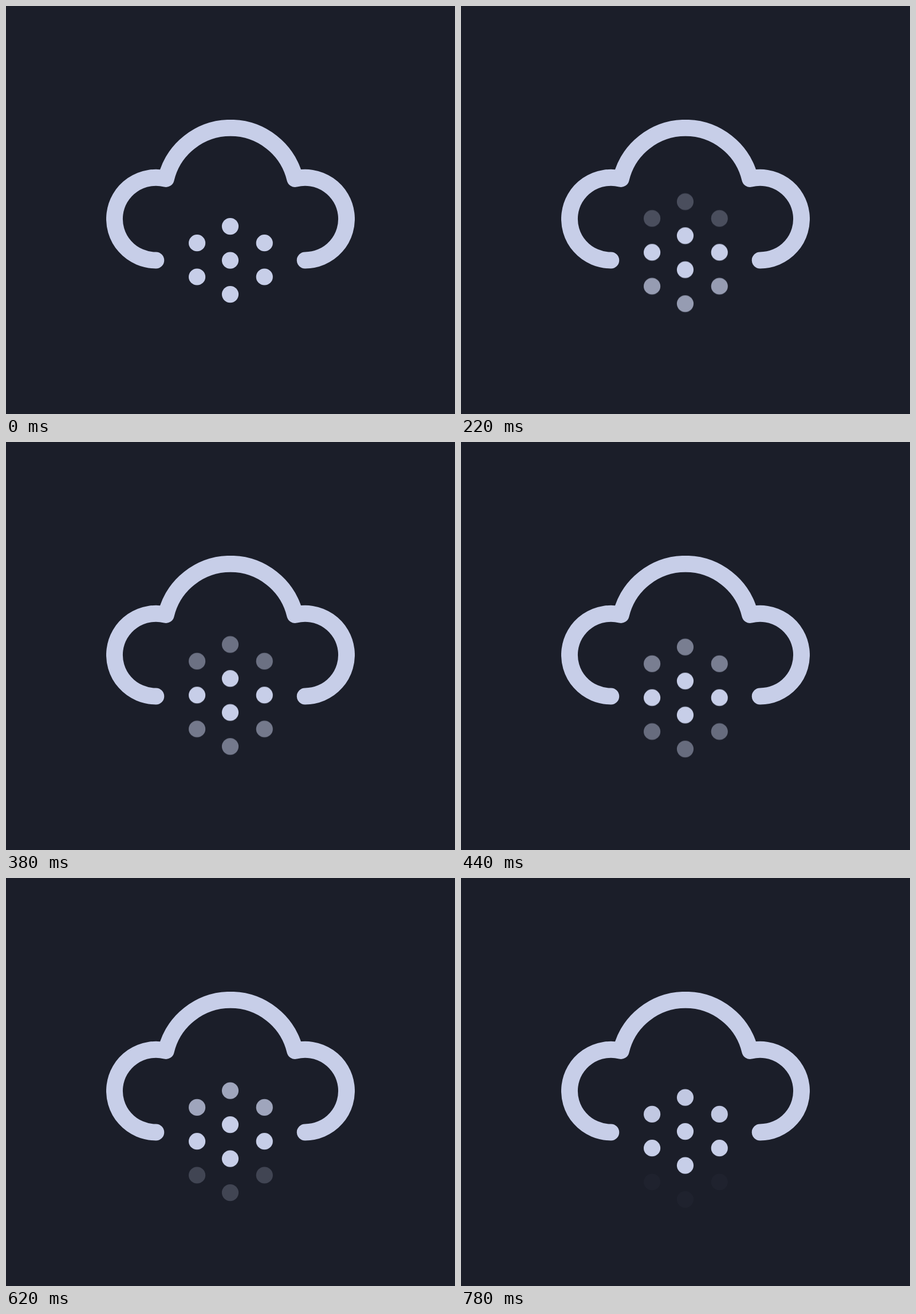
Write an HTML page that moves like this. It is 784 px wide and 714 px high and loops after 800 ms.

```html
<!DOCTYPE html>
<html lang="en">
<head>
<meta charset="utf-8">
<title>Snow cloud</title>
<style>
  html, body { margin: 0; width: 100%; height: 100%; overflow: hidden; background: #1b1e29; }
  svg { display: block; }
  .snow { fill: #c7cee8; animation: fall .8s steps(40) infinite; }
  .in { animation: appear .8s steps(40) infinite; }
  .out { animation: appear .8s steps(40) infinite reverse; animation-name: vanish; animation-direction: normal; }
  @keyframes fall { from { transform: translateY(0); } to { transform: translateY(59.4px); } }
  @keyframes appear { from { opacity: 0; } to { opacity: 1; } }
  @keyframes vanish { from { opacity: 1; } to { opacity: 0; } }
</style>
</head>
<body>
<svg width="784" height="714" viewBox="0 0 784 714">
  <svg x="175" y="199" width="434" height="434" viewBox="0 0 30 30">
    <path d="M6 17A5 5 0 1 1 7.215 7.15A8 8 0 0 1 22.785 7.15A5 5 0 1 1 24 17"
      fill="none" stroke="#c7cee8" stroke-width="2" stroke-linecap="round" stroke-linejoin="round"/>
  </svg>
  <g class="snow"></g>
</svg>
<script>
  const snow = document.querySelector('.snow');
  const columns = [
    { x: 333.6, y: 355.4, gap: 59.3, count: 3 },
    { x: 391.5, y: 326.1, gap: 59.5, count: 4 },
    { x: 451.3, y: 355.4, gap: 59.3, count: 3 }
  ];

  for (const { x, y, gap, count } of columns) {
    for (let i = 0; i < count; i++) {
      const flake = document.createElementNS('http://www.w3.org/2000/svg', 'circle');
      flake.setAttribute('cx', x);
      flake.setAttribute('cy', y + i * gap);
      flake.setAttribute('r', 14.6);
      if (i === 0) flake.classList.add('in');
      if (i === count - 1) flake.classList.add('out');
      snow.append(flake);
    }
  }
</script>
</body>
</html>
```
